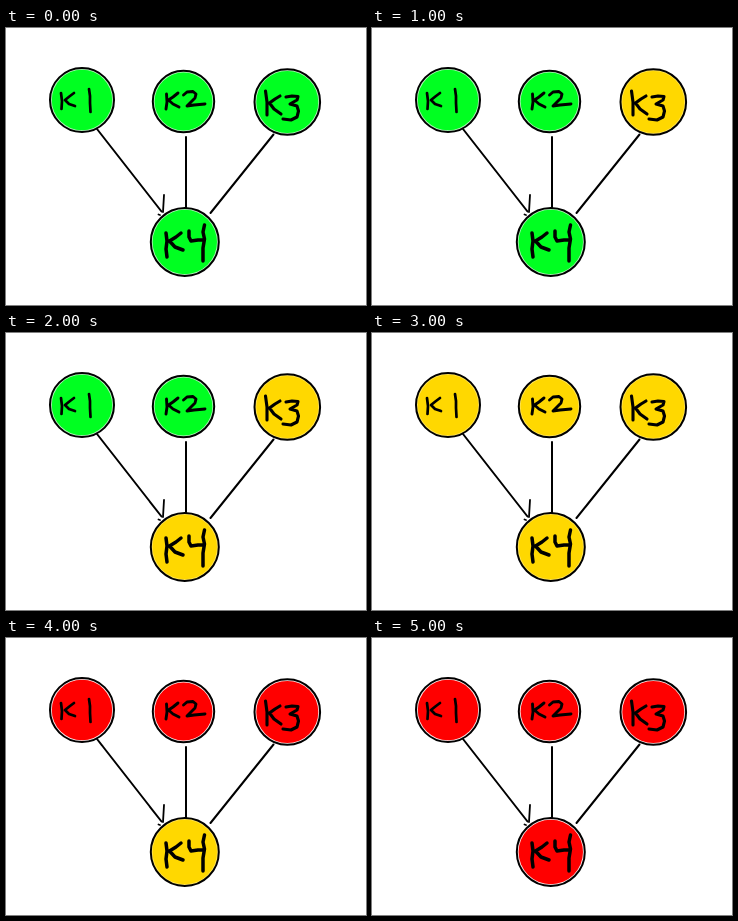
Recreate the animation shown at these times as an HTML page. Size 360 by 277 pixels, loop 6000 ms.

```html
<!DOCTYPE html>
<html lang="en">
<head>
<meta charset="utf-8">
<title>Node states</title>
<style>
html, body { margin: 0; width: 100%; height: 100%; overflow: hidden; background: #fff; }
svg { display: block; width: 100%; height: 100%; }
.ink { fill: none; stroke: #000; stroke-linecap: round; stroke-linejoin: round; }
</style>
</head>
<body>
<svg id="stage" viewBox="0 0 360 277">
  <rect width="360" height="277" fill="#fff"/>
  <g class="ink" stroke-width="2">
    <path d="M91 101L155.500 183.500M180 109V180M267.500 106.500L204.500 185"/>
    <path d="M158 167L157 184M152.500 186.500L154 187" stroke-width="1.800"/>
  </g>
</svg>
<script>
const NS = 'http://www.w3.org/2000/svg';
const stage = document.getElementById('stage');
const COLORS = { g: '#00ff21', y: '#ffd800', r: '#ff0000' };
const RINGS = { g: '#b4f5bd', y: '#ffe45a', r: '#ffe9e9' };
const STEP = 1000;

// One letter per second: g, y or r.
const nodes = [
  { name: 'K1', x: 76, y: 72, r: 32, w: 2.7, states: 'gggyrr',
    d: 'M55 65L56 73 55.500 81M68 65L64 68 59 72 63 76 69 78M83 61L84 68 84 75 84.500 84' },
  { name: 'K2', x: 177.5, y: 73.5, r: 30.7, w: 2.9, states: 'gggyrr',
    d: 'M160.500 66L161 74 160 81M172 65L167 69 162.500 72 167 76 173 79M177.500 67L181 64 187 63.500 190 66 189 70 185 74 181 78 188 77 199 76' },
  { name: 'K3', x: 281.3, y: 74, r: 32.8, w: 3.1, states: 'gyyyrr',
    d: 'M259.500 63L261 74 261 87M274 68L269 71 263.500 75 268 81 275 86M280 69L286 68 292 68.500 291 72 284 76 291 78 292.500 83 291 89 285 92 277 91' },
  { name: 'K4', x: 178.8, y: 214, r: 34, w: 3.5, states: 'ggyyyr',
    d: 'M160 205L161 213 160 221 161 229M175 205L170 209 163.500 213 169 219 177 222M183 203L183 209 185 213 192 212 198 212M198.500 197L197 204 198.500 211 197 220 197 233' }
];

function add(tag, attrs) {
  const el = document.createElementNS(NS, tag);
  for (const key in attrs) el.setAttribute(key, attrs[key]);
  return stage.appendChild(el);
}

for (const n of nodes) {
  const at = { cx: n.x, cy: n.y };
  n.ring = add('circle', { ...at, r: n.r });
  n.disc = add('circle', { ...at, r: n.r - 1.8 });
  add('circle', { ...at, r: n.r, class: 'ink', 'stroke-width': 2 });
  add('path', { d: n.d, class: 'ink', 'stroke-width': n.w, role: 'img', 'aria-label': n.name });
}

function render(ms) {
  const step = Math.floor(ms / STEP) % 6;
  for (const n of nodes) {
    const state = n.states[step];
    n.ring.setAttribute('fill', RINGS[state]);
    n.disc.setAttribute('fill', COLORS[state]);
  }
}

let start;
function tick(now) {
  start ??= now;
  render(Math.max(0, now - start));
  requestAnimationFrame(tick);
}
render(0);
requestAnimationFrame(tick);
</script>
</body>
</html>
```
